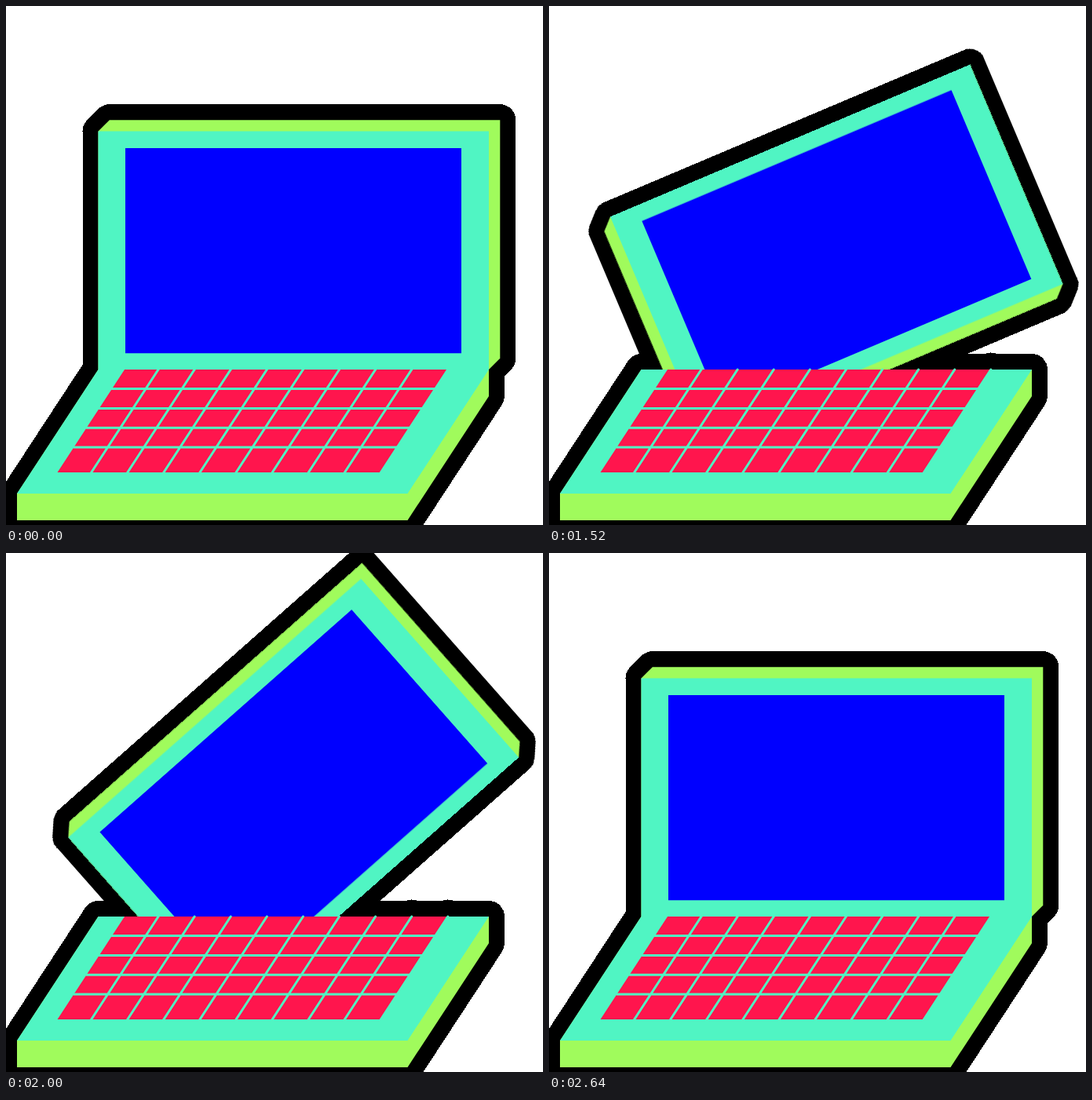
Animation of 684 by 661 pixels, one loop 3 s. Source, as an HTML page:

```html
<!DOCTYPE html>
<html lang="en">
<head>
<meta charset="utf-8">
<title>Laptop</title>
<style>
  html, body { margin: 0; width: 100%; height: 100%; overflow: hidden; background: #fff; }
  svg { display: block; width: 684px; height: 661px; }
  .lid { transform-origin: 366.25px 311.25px; }
  .outline { fill: #000; stroke: #000; stroke-width: 40; stroke-linejoin: round; stroke-linecap: round; shape-rendering: crispEdges; }
  .teal { fill: #50f5c3; }
  .green { fill: #a0fb5c; }
  .blue { fill: #00f; }
  .red { fill: #ff154d; }
  .grid { stroke: #50f5c3; stroke-width: 3; stroke-linecap: round; }
  .tips { stroke-width: 43; }
</style>
</head>
<body>
<svg viewBox="0 0 684 661">
  <defs>
    <path id="lidShape" d="M117.5 159.5L131.8 145.2H629.3V448.7L615 463H117.5Z"/>
    <path id="baseShape" d="M117.5 463H615V497L511.5 655H14V621Z"/>
  </defs>

  <g class="outline">
    <use class="lid" href="#lidShape"/>
    <use href="#baseShape"/>
    <path class="tips" id="tips"/>
  </g>

  <g class="lid">
    <use class="green" href="#lidShape"/>
    <path class="teal" d="M117.5 159.5H615V463H117.5Z"/>
    <path class="blue" d="M152 181H580V442.3H152Z"/>
  </g>

  <use class="green" href="#baseShape"/>
  <path class="teal" d="M117.5 463H615L511.5 621H14Z"/>
  <path class="red" d="M151 463H562L476.5 594H65.5Z"/>
  <path class="grid" id="grid"/>
</svg>
<script>
const LOOP = 3000, FRAME = 40, START = 1080, SPIN = 1580;

// Keyboard grid: slanted columns and level rows
let columns = '', rows = '', tips = '';
for (let i = 0; i < 9; i++) {
  const x = 194 + 46.1 * i;
  columns += `M${x} 463L${x - 85.3} 594`;
  tips += `M${x} 463l-6.5 10`;
}
for (const y of [487.5, 512.5, 537.2, 562]) {
  const shift = (y - 463) * 0.652;
  rows += `M${151 - shift} ${y}H${562 - shift}`;
}
document.getElementById('grid').setAttribute('d', columns + rows);
document.getElementById('tips').setAttribute('d', tips);

// cubic-bezier(0.331, 0, 0.144, 1)
function ease(x) {
  if (x <= 0) return 0;
  if (x >= 1) return 1;
  let lo = 0, hi = 1;
  for (let i = 0; i < 40; i++) {
    const t = (lo + hi) / 2, u = 1 - t;
    if (3 * 0.331 * t * u * u + 3 * 0.144 * t * t * u + t ** 3 < x) lo = t;
    else hi = t;
  }
  return lo * lo * (3 - 2 * lo);
}

// One full turn, held at 25 poses per second
const poses = [];
for (let time = 0; time <= LOOP; time += FRAME) {
  const angle = time > 2600 ? 360 : 360 * ease((time - START) / SPIN);
  poses.push({ offset: time / LOOP, transform: `rotate(${angle.toFixed(3)}deg)`, easing: 'step-end' });
}
for (const part of document.querySelectorAll('.lid')) {
  part.animate(poses, { duration: LOOP, iterations: Infinity, delay: -2 });
}
</script>
</body>
</html>
```
